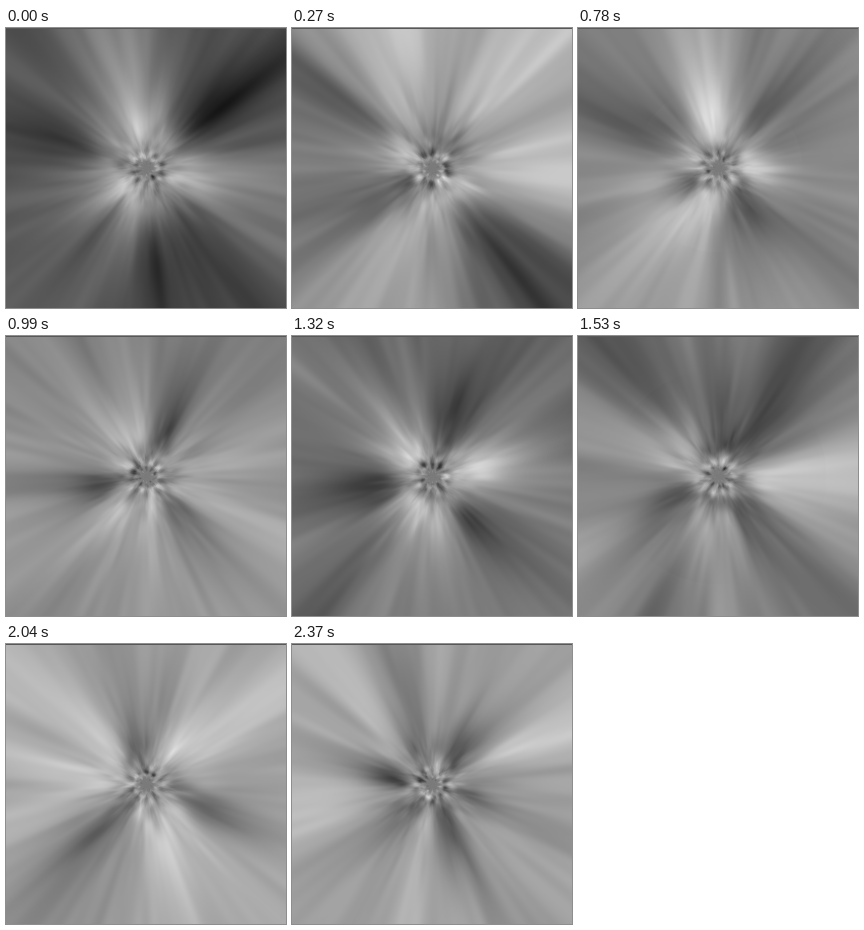
Recreate the animation shown at these times as an HTML page with a canvas. Size 280 by 280 pixels, loop 2430 ms.

```html
<!DOCTYPE html>
<html lang="en">
<head>
<meta charset="utf-8">
<title>Tunnel</title>
<style>
html, body { margin: 0; width: 100%; height: 100%; overflow: hidden; background: #777; }
canvas { display: block; width: 280px; height: 280px; }
</style>
</head>
<body>
<canvas id="c" width="280" height="280"></canvas>
<script>
const SIZE = 280, LOOP = 2430, STEPS = 37;
const LONG = [3, 7, 12, 17, 21, 25, 31];  // steps held 90 ms, the others 60 ms
const W = 512, H = 4900;                  // tunnel wall: angle by depth
const SPEED = 4096 / LOOP, MEAN = 138, HUB = 122;

const clamp = (x, a, b) => Math.min(b, Math.max(a, x));
const smooth = x => x * x * (3 - 2 * x);
const ramp = (x, a, b) => smooth(clamp((x - a) / (b - a), 0, 1));
const depthAt = r => 8192 / (r + 6);

let seed = 20117;
function rnd() {
  seed = (seed + 0x6D2B79F5) | 0;
  let x = Math.imul(seed ^ (seed >>> 15), 1 | seed);
  x = (x + Math.imul(x ^ (x >>> 7), 61 | x)) ^ x;
  return ((x ^ (x >>> 14)) >>> 0) / 4294967296;
}

// Three dark rays 120 degrees apart, with side rays halfway between them
const scenes = [
  { t: 0,    light: 88,  turn: 78,  r: 92, dark: 55, side: 62 },
  { t: 600,  light: 168, turn: 103, r: 48, dark: 78, side: -36 },
  { t: 990,  light: 145, turn: 52,  r: 50, dark: 52, side: 42 },
  { t: 1320, light: 108, turn: 51,  r: 62, dark: 55, side: 72 },
  { t: 1740, light: 164, turn: 71,  r: 50, dark: 74, side: -38 },
  { t: 2040, light: 160, turn: 16,  r: 68, dark: 52, side: 42 },
  { t: 2370, light: 166, turn: 71,  r: 50, dark: 74, side: -38 }
];

const wall = new Float32Array(W * H);

// Each scene tints the near end of the wall, which then fades to the mean
function lightAt(v) {
  return scenes.reduce((sum, s) => {
    const d = v - s.t * SPEED;
    return sum + (s.light - MEAN) * ramp(d, -160, 30) * (1 - ramp(d, 70, 260));
  }, MEAN);
}

// 0 where a scene's rays lie, 1 between scenes
function gapAt(v) {
  const d = Math.min(...scenes.map(s => Math.abs(v - s.t * SPEED - 160)));
  return ramp(d, 150, 290);
}

function addNoise(cols, len, amp, gain) {
  const rows = Math.ceil(H / len) + 2;
  const grid = Float32Array.from({ length: cols * rows }, () => (rnd() * 2 - 1) * amp);
  const line = new Float32Array(cols + 1);
  for (let v = 0; v < H; v++) {
    const k = gain(v);
    const g = Math.floor(v / len), f = smooth(v / len - g);
    for (let i = 0; i <= cols; i++) {
      const a = grid[g * cols + i % cols], b = grid[(g + 1) * cols + i % cols];
      line[i] = (a + (b - a) * f) * k;
    }
    for (let u = 0; u < W; u++) {
      const x = u * cols / W, i = Math.floor(x);
      wall[v * W + u] += line[i] + (line[i + 1] - line[i]) * smooth(x - i);
    }
  }
}

// n soft rays, spread evenly around the wall
function addRays(t, n, turn, r, amp, width) {
  const v0 = depthAt(r), mid = v0 + t * SPEED;
  const end = Math.min(H, mid + v0 * 1.6);
  const profile = Float32Array.from({ length: W }, (_, u) => {
    const gap = 360 / n, d = u / W * 360 - turn;
    const off = d - gap * Math.round(d / gap);
    return amp * Math.exp(-0.5 * (off / width) ** 2);
  });
  for (let v = Math.max(0, Math.floor(mid - v0 * 1.2)); v < end; v++) {
    const k = Math.exp(-0.5 * ((v - mid) / (v0 * (v < mid ? 0.4 : 0.6))) ** 2);
    for (let u = 0; u < W; u++) wall[v * W + u] += profile[u] * k;
  }
}

for (let v = 0; v < H; v++) wall.fill(lightAt(v), v * W, v * W + W);
addNoise(7, 170, 65, gapAt);
for (let k = 1; k < 5; k++) {
  addNoise(7 * 2 ** k, 190 / 1.45 ** k, 44 * 0.6 ** k, () => 1);
}
for (const { t, turn, r, dark, side } of scenes) {
  addRays(t, 3, turn, r, -dark, 12);
  addRays(t, 3, turn + 60, 44, side, 16);
  addRays(t, 6, turn + 30, 36, 22, 9);
}

// Per-pixel angle, depth, blend into the grey hub and fixed petals around it
const N = SIZE * SIZE;
const [ang, depth, show, petal] = Array.from({ length: 4 }, () => new Float32Array(N));
for (let i = 0; i < N; i++) {
  const x = i % SIZE - 140, y = Math.floor(i / SIZE) - 140;
  const r = Math.hypot(x, y), a = Math.atan2(y, x), wave = Math.cos(10 * a);
  ang[i] = (a / (2 * Math.PI) * W + W) % W;
  depth[i] = depthAt(r);
  show[i] = ramp(r - 2.5 * wave, 4, 14);
  petal[i] = 26 * wave * Math.exp(-(((r - 15) / 6) ** 2));
}

const ctx = document.getElementById('c').getContext('2d');
const img = ctx.createImageData(SIZE, SIZE);
const px = new Uint32Array(img.data.buffer);

function draw(t) {
  const shift = t * SPEED;
  for (let i = 0; i < N; i++) {
    const row = Math.min(H - 1, Math.floor(depth[i] + shift)) * W;
    const u = Math.floor(ang[i]), f = ang[i] - u;
    const a = wall[row + u % W], b = wall[row + (u + 1) % W];
    let g = HUB + (a + (b - a) * f - HUB) * show[i] + petal[i];
    if (i < SIZE) g = 88;
    g = Math.round(clamp(g, 18, 232));
    px[i] = 0xff000000 | g << 16 | g << 8 | g;
  }
  ctx.putImageData(img, 0, 0);
}

const times = [0];
for (let i = 0; i < STEPS - 1; i++) times.push(times[i] + (LONG.includes(i) ? 90 : 60));

let start = null, last = 0;
draw(0);
function tick(now) {
  if (start === null) start = now;
  const t = Math.max(0, now - start) % LOOP;
  let n = STEPS - 1;
  while (times[n] > t) n--;
  if (n !== last) draw(times[last = n]);
  requestAnimationFrame(tick);
}
requestAnimationFrame(tick);
</script>
</body>
</html>
```
